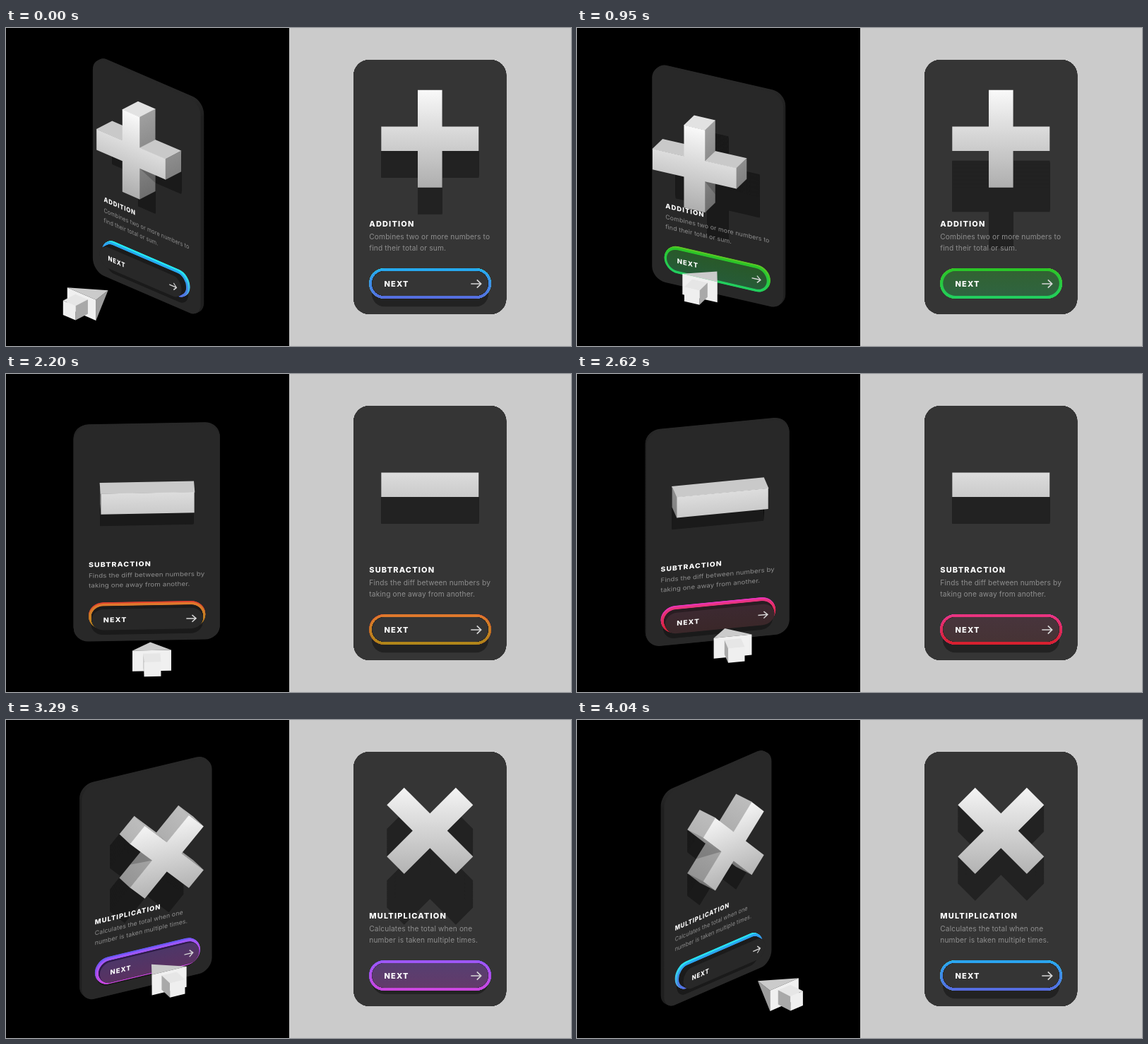
An HTML page with a canvas for the animation above (4140 ms loop, 800 px wide and 450 px high).

```html
<!DOCTYPE html>
<html lang="en">
<head>
<meta charset="utf-8">
<title>Operator cards</title>
<style>
html, body { margin: 0; width: 100%; height: 100%; overflow: hidden; background: #000; }
canvas { display: block; width: 800px; height: 450px; }
</style>
</head>
<body>
<canvas id="stage" width="800" height="450"></canvas>
<script>
const ctx = document.getElementById('stage').getContext('2d');
const LOOP = 4140, HALF = LOOP / 2;
const FONT = 'Inter, "Open Sans", sans-serif';
const ARM = 17.3, REACH = 69, DEPTH = 34.5, SLANT = 1.1;
const CARD = 7, RING = 4, BUTTON = 14;
const MARK_Y = -68.3, BUTTON_Y = 136.5;

const YAW = [[0, 42.4], [475, 35], [950, 26], [1500, 13.2], [2200, -2.2],
  [3000, -20.2], [3580, -33.6], [4040, -42.6], [LOOP, -44.5]];
const TOP = [[0, 200, 87, 54], [950, 118, 68, 46], [1500, 65, 70, 41], [2200, 25, 75, 53],
  [3000, -72, 86, 59], [3580, -118, 100, 73], [4040, -158, 87, 55], [LOOP, -160, 87, 54]];
const BOTTOM = [[0, 231, 68, 61], [950, 142, 72, 47], [1500, 98, 75, 38], [2200, 44, 75, 39],
  [3000, -47, 74, 56], [3580, -85, 65, 58], [4040, -128, 68, 61], [LOOP, -129, 68, 61]];

const CARDS = [
  { title: 'ADDITION', lines: ['Combines two or more numbers to', 'find their total or sum.'] },
  { title: 'SUBTRACTION', lines: ['Finds the diff between numbers by', 'taking one away from another.'] },
  { title: 'MULTIPLICATION', lines: ['Calculates the total when one', 'number is taken multiple times.'] }
];

const a = ARM, b = REACH;
const plus = [[-a, -b], [a, -b], [a, -a], [b, -a], [b, a], [a, a],
  [a, b], [-a, b], [-a, a], [-b, a], [-b, -a], [-a, -a]];
const minus = [[-b, -a], [b, -a], [b, a], [-b, a]];
const cross = plus.map(([x, y]) => [(x - y) * Math.SQRT1_2, (x + y) * Math.SQRT1_2]);
const MARKS = [plus, minus, cross];

const clamp = v => Math.max(0, Math.min(1, v));
const ramp = (t, from, to) => clamp((t - from) / (to - from));

function sample(keys, t) {
  let i = 1;
  while (i < keys.length - 1 && t > keys[i][0]) i++;
  const p = keys[i - 1], q = keys[i], k = ramp(t, p[0], q[0]);
  return p.slice(1).map((v, n) => v + (q[n + 1] - v) * k);
}

const hsl = ([h, s, l], turn = 0) => `hsl(${h + turn}, ${s}%, ${l}%)`;
const gray = v => `rgb(${v | 0}, ${v | 0}, ${v | 0})`;
const tone = y => 249 - 75 * clamp((y + REACH) / (2 * REACH));

// Orthographic view: screen vectors of the three model axes
function makeView(cx, cy, scale, yaw, pitch, colors) {
  const r = Math.PI / 180;
  const s = Math.sin(yaw * r), c = Math.cos(yaw * r);
  const sp = Math.sin(pitch * r), cp = Math.cos(pitch * r);
  const X = [c * scale, s * sp * scale], Y = [0, cp * scale], Z = [-s * scale, c * sp * scale];
  return {
    ...colors,
    point: (x, y, z) => [cx + X[0] * x + Z[0] * z, cy + X[1] * x + Y[1] * y + Z[1] * z],
    plane: (z, y = 0) => ctx.setTransform(X[0], X[1], Y[0], Y[1],
      cx + Z[0] * z, cy + Z[1] * z + Y[1] * y),
    facing: (x, y, z = 0) => (x * s + z * c) * cp - y * sp
  };
}

function poly(points, fill) {
  ctx.beginPath();
  points.forEach(([x, y]) => ctx.lineTo(x, y));
  ctx.closePath();
  ctx.fillStyle = fill;
  ctx.fill();
}

function box(x, y, w, h, r, fill) {
  ctx.beginPath();
  ctx.roundRect(x, y, w, h, r);
  ctx.fillStyle = fill;
  ctx.fill();
}

function fade(y0, y1, c0, c1) {
  const g = ctx.createLinearGradient(0, y0, 0, y1);
  g.addColorStop(0, c0);
  g.addColorStop(1, c1);
  return g;
}

function label(str, x, y, font, spacing, fill) {
  ctx.font = `${font} ${FONT}`;
  ctx.letterSpacing = spacing + 'px';
  ctx.fillStyle = fill;
  ctx.fillText(str, x, y);
}

const plate = fill => box(-108, -180, 216, 360, 22, fill);
const rim = fill => box(-86, BUTTON_Y - 21.5, 172.5, 43, 21.5, fill);
const pill = fill => box(-82, BUTTON_Y - 17.4, 164.5, 34.8, 17.4, fill);

function drawCard(view, st) {
  const edge = fade(-180, -155, view.face, view.edge);
  for (let z = -CARD; z < 0; z++) {
    view.plane(z);
    plate(edge);
  }
  view.plane(0);
  plate(view.face);

  for (let z = st.lift; z <= st.lift + DEPTH; z += 0.5) {
    view.plane(0, MARK_Y + z * SLANT);
    poly(MARKS[st.index], view.shade);
  }
  for (let z = 0; z <= st.button; z += 0.5) {
    view.plane(0, z * SLANT);
    pill(view.shade);
  }

  view.plane(0);
  const card = CARDS[st.index];
  label(card.title, -86, 55.5, '800 11px', 1.15, '#fff');
  card.lines.forEach((line, i) =>
    label(line, -86, 73.5 + i * 16.4, '400 10.2px', 0.13, '#8e8e8e'));
}

function drawButton(view, st) {
  const glow = turn => fade(BUTTON_Y - 21.5, BUTTON_Y + 21.5, hsl(st.top, turn), hsl(st.bottom, turn));
  const tint = glow(0), wall = glow(-18);
  for (let z = 0; z < RING; z += 0.5) {
    view.plane(z);
    rim(wall);
  }
  view.plane(RING);
  rim(tint);
  const side = hsl([st.top[0], st.fill * 48, 11 + st.fill * 9]);
  for (let z = RING; z < st.button; z += 0.5) {
    view.plane(z);
    pill(side);
  }
  view.plane(st.button);
  pill(view.face);
  ctx.globalAlpha = 0.31 * st.fill;
  pill(tint);
  ctx.globalAlpha = 1;
  label('NEXT', -64.8, BUTTON_Y + 4.4, '800 11px', 1.15, '#fff');
  ctx.strokeStyle = '#d6d6d6';
  ctx.lineWidth = 1.7;
  ctx.beginPath();
  ctx.moveTo(58, BUTTON_Y + 0.5);
  ctx.lineTo(72, BUTTON_Y + 0.5);
  ctx.moveTo(66.5, BUTTON_Y - 5.2);
  ctx.lineTo(72.3, BUTTON_Y + 0.5);
  ctx.lineTo(66.5, BUTTON_Y + 6.2);
  ctx.stroke();
}

function markSides(shape, view) {
  const n = shape.length;
  const edges = shape.map((p, i) => {
    const q = shape[(i + 1) % n], len = Math.hypot(q[0] - p[0], q[1] - p[1]);
    return { p, q, len, dx: (q[0] - p[0]) / len, dy: (q[1] - p[1]) / len };
  });
  const concave = (e, f) => e.dx * f.dy - e.dy * f.dx < -0.01;
  edges.forEach((e, i) => {
    const prev = edges[(i + n - 1) % n], next = edges[(i + 1) % n];
    const reach = DEPTH * SLANT * Math.abs(e.dy) / e.len;
    e.depth = view.facing((e.p[0] + e.q[0]) / 2, (e.p[1] + e.q[1]) / 2);
    // An arm above throws a triangle of shade on this side
    if (concave(prev, e) && prev.dx < -0.5) e.cast = [0, reach];
    if (concave(e, next) && next.dx < -0.5) e.cast = [1, 1 - reach];
  });
  return edges.filter(e => view.facing(e.dy, -e.dx) > 0.001).sort((e, f) => e.depth - f.depth);
}

function drawMark(view, st) {
  const shape = MARKS[st.index], z0 = st.lift, z1 = st.lift + DEPTH;
  for (const e of markSides(shape, view)) {
    const o = view.point(e.p[0], e.p[1] + MARK_Y, z0);
    const u = view.point(e.q[0], e.q[1] + MARK_Y, z0);
    const v = view.point(e.p[0], e.p[1] + MARK_Y, z1);
    ctx.setTransform(u[0] - o[0], u[1] - o[1], v[0] - o[0], v[1] - o[1], o[0], o[1]);
    const k = 0.64 + 0.27 * clamp(e.dx) ** 2;
    const g = ctx.createLinearGradient(0, 0, 1, 0);
    g.addColorStop(0, gray(tone(e.p[1]) * k));
    g.addColorStop(1, gray(tone(e.q[1]) * k));
    ctx.fillStyle = g;
    ctx.fillRect(-0.005, 0, 1.01, 1.02);
    if (e.cast) {
      const [from, to] = e.cast;
      poly([[from, 1], [from, 0], [to, 0]], 'rgba(0, 0, 0, 0.2)');
    }
  }
  view.plane(z1, MARK_Y);
  poly(shape, fade(-REACH, REACH, gray(tone(-REACH)), gray(tone(REACH))));
}

function drawCursor(view, tip) {
  ctx.setTransform(1, 0, 0, 1, 0, 0);
  const base = tip + 58, end = base + 27;
  const at = (x, y, z) => view.point(x + 2, BUTTON_Y + 1.5 + y, z);
  const ring = (w, h, z) => [at(-w, -h, z), at(w, -h, z), at(w, h, z), at(-w, h, z)];
  const apex = at(0, 0, tip);
  const head = ring(28.7, 17.2, base), near = ring(12.5, 12, base), far = ring(12.5, 12, end);
  // Only the faces turned to the viewer
  if (view.facing(58, 0, -28.7) > 0) poly([apex, head[1], head[2]], '#9d9d9d');
  if (view.facing(-58, 0, -28.7) > 0) poly([apex, head[0], head[3]], '#9d9d9d');
  if (view.facing(0, -58, -17.2) > 0) poly([apex, head[0], head[1]], '#cbcbcb');
  poly(head, '#f0f0f0');
  poly([near[0], near[1], far[1], far[0]], '#e6e6e6');
  if (view.facing(1, 0) > 0) poly([near[1], near[2], far[2], far[1]], '#a9a9a9');
  else poly([near[0], near[3], far[3], far[0]], '#a9a9a9');
  poly(far, '#efefef');
}

function drawScene(view, st) {
  drawCard(view, st);
  drawButton(view, st);
  drawMark(view, st);
}

function stateAt(t) {
  const phase = t % HALF;
  const tip = 46 + 41 * Math.cos(phase / HALF * Math.PI * 2);
  const button = Math.max(RING, Math.min(BUTTON, tip - 3));
  return {
    tip, button,
    lift: 44 * clamp((BUTTON - button) / 8),
    fill: ramp(phase, 500, 650) * (1 - ramp(phase, 1560, 1720)),
    index: Math.floor(t / HALF + 0.5), // swaps while the button is fully down
    top: sample(TOP, t),
    bottom: sample(BOTTOM, t)
  };
}

function draw(t) {
  const st = stateAt(t);
  ctx.setTransform(1, 0, 0, 1, 0, 0);
  ctx.fillStyle = '#000';
  ctx.fillRect(0, 0, 401, 450);
  ctx.fillStyle = '#cbcbcb';
  ctx.fillRect(401, 0, 399, 450);

  const left = makeView(199.3, 225, 0.958, sample(YAW, t)[0], 28.2,
    { face: '#282828', edge: '#1f1f1f', shade: '#1a1a1a' });
  const right = makeView(600.3, 225, 1, 0, 0,
    { face: '#353535', edge: '#353535', shade: '#222222' });
  drawScene(left, st);
  drawCursor(left, st.tip);
  drawScene(right, st);
}

const start = performance.now();
function tick(now) {
  draw(Math.max(0, now - start) % LOOP);
  requestAnimationFrame(tick);
}
draw(0);
requestAnimationFrame(tick);
</script>
</body>
</html>
```
